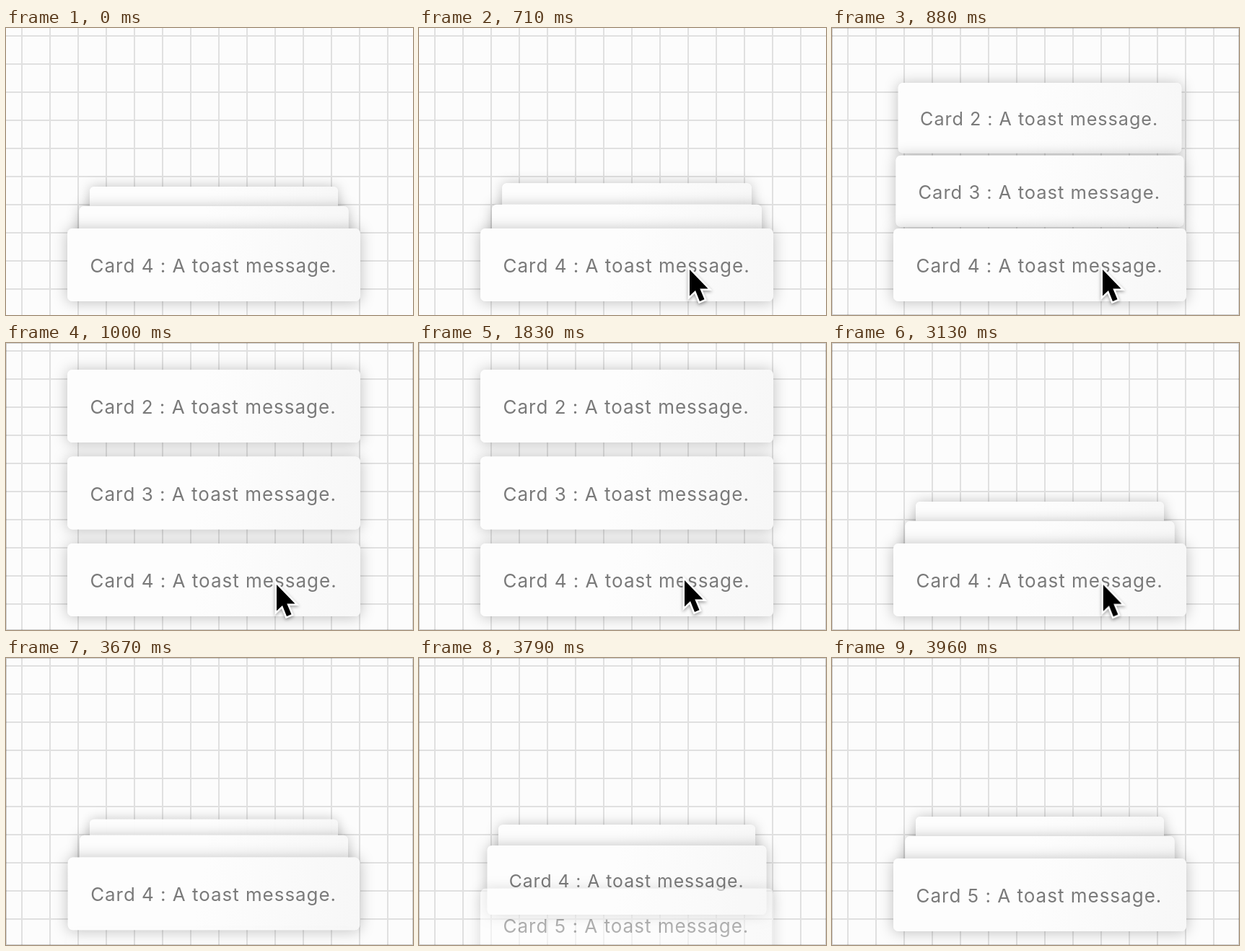
An HTML page that plays this animation: 564x398 px, repeating every 4.19 s.

```html
<!DOCTYPE html>
<html lang="en">
<head>
<meta charset="utf-8">
<title>Toast stack</title>
<style>
  html, body { margin: 0; width: 100%; height: 100%; overflow: hidden; }
  #stage {
    position: relative; width: 564px; height: 398px; overflow: hidden;
    background:
      linear-gradient(#e0e0e0 2px, transparent 2px) 21px 10px / 39px 39px,
      linear-gradient(90deg, #e0e0e0 2px, transparent 2px) 21px 10px / 39px 39px,
      #fcfcfc;
  }
  .card {
    position: absolute; left: 85px; top: 278px; width: 406px; height: 101px;
    box-sizing: border-box; padding-left: 31.5px; border-radius: 7px;
    background: linear-gradient(100deg, #fdfdfd 45%, #f7f7f7);
    box-shadow: 0 1px 20px rgba(0, 0, 0, .25);
    font: 400 26px/103px Inter, Roboto, sans-serif; letter-spacing: 1px;
    color: #7a7a7a; white-space: nowrap;
  }
  #edge { position: absolute; inset: 0; box-shadow: inset 0 0 0 1px rgba(0, 0, 0, .18); }
  #cursor {
    position: absolute; left: 0; top: 0; overflow: visible;
    filter: drop-shadow(0 2px 2px rgba(0, 0, 0, .35));
  }
</style>
</head>
<body>
<div id="stage">
  <div class="card" id="c2">Card 2 : A toast message.</div>
  <div class="card" id="c3">Card 3 : A toast message.</div>
  <div class="card" id="c4">Card 4 : A toast message.</div>
  <div class="card" id="c5">Card 5 : A toast message.</div>
  <div id="edge"></div>
  <svg id="cursor" width="40" height="56">
    <path d="M0 0V36.5L8 29L14 44L20.5 41.3L14.3 26.5H25.5Z"
      fill="#000" stroke="#fff" stroke-width="5" paint-order="stroke" stroke-linejoin="miter"/>
  </svg>
</div>
<script>
const LOOP = 4190, MOVE = 300;
const OPEN = 677, CLOSE = 2175, PUSH = 3626;

// Each pose: vertical shift, scale, opacity
const front = [0, 1, 1], second = [-35, .919, 1], third = [-65.7, .847, 1];
const openSecond = [-120.5, 1, 1], openThird = [-241, 1, 1];
const below = [101, 1, 0], gone = [14, .847, 0];

const start = document.timeline.currentTime || 0;

function play(id, frames) {
  const anim = document.getElementById(id).animate(
    frames.map(({ at, ...rest }) => ({ offset: at / LOOP, ...rest })),
    { duration: LOOP, iterations: Infinity });
  anim.startTime = start;
}

function poseCard(id, first, moves) {
  const frame = (at, [y, s, opacity], easing = "linear") =>
    ({ at, transform: `translateY(${y}px) scale(${s})`, opacity, easing });
  const frames = [frame(0, first)];
  let last = first;
  for (const [at, pose] of moves) {
    frames.push(frame(at, last, "ease-in-out"), frame(at + MOVE, pose));
    last = pose;
  }
  frames.push(frame(LOOP, last));
  play(id, frames);
}

poseCard("c2", third, [[OPEN, openThird], [CLOSE, third], [PUSH, gone]]);
poseCard("c3", second, [[OPEN, openSecond], [CLOSE, second], [PUSH, third]]);
poseCard("c4", front, [[PUSH, second]]);
poseCard("c5", below, [[PUSH, front]]);

const point = (at, x, y, easing = "linear") =>
  ({ at, transform: `translate(${x}px, ${y}px)`, easing });
play("cursor", [
  point(0, 464, 406),
  point(130, 464, 406, "cubic-bezier(.3, .4, .4, 1)"),
  point(670, 375, 335),
  point(1215, 375, 335),
  point(1290, 368, 329),
  point(3095, 368, 329, "ease-in"),
  point(3250, 464, 406),
  point(LOOP, 464, 406)
]);

play("edge", [
  { at: 0, opacity: 0, easing: "step-end" },
  { at: 730, opacity: 1 },
  { at: LOOP, opacity: 1 }
]);
</script>
</body>
</html>
```
